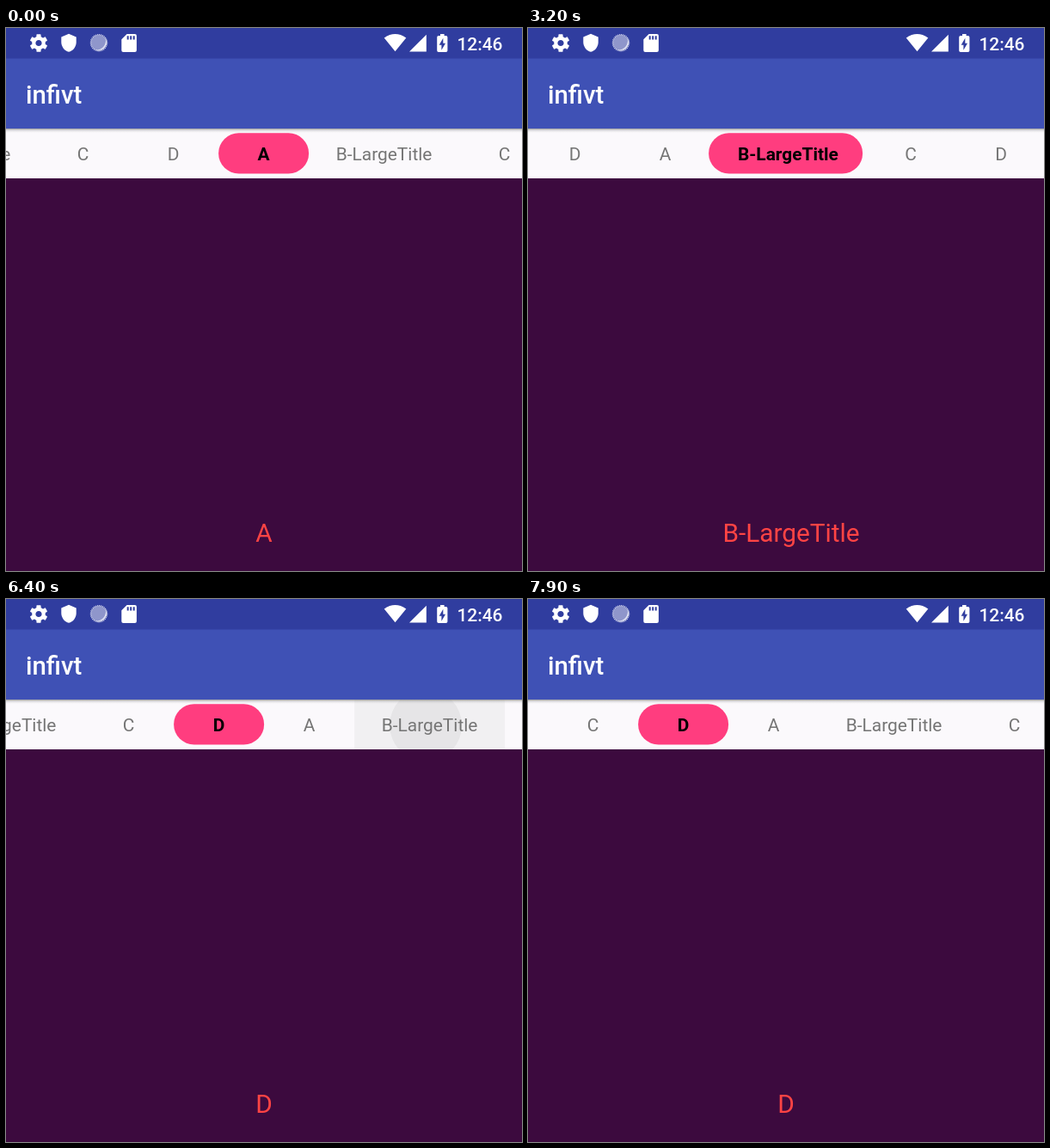
Recreate the animation shown at these times as an HTML page. Size 600 by 632 pixels, loop 8000 ms.

```html
<!DOCTYPE html>
<html lang="en">
<head>
<meta charset="utf-8">
<title>Infinite tabs</title>
<style>
  html, body { margin: 0; width: 100%; height: 100%; overflow: hidden; background: #3c0a3e; }
  svg { display: block; width: 100%; height: 100%; font-family: Roboto, sans-serif; }
  .tab { font-size: 20.9px; fill: #757575; text-anchor: middle; }
  .tab.on { font-weight: 700; fill: #000; }
  .page { font-size: 29.8px; fill: #ff4444; text-anchor: middle; }
</style>
</head>
<body>
<svg viewBox="0 0 600 632">
  <defs>
    <linearGradient id="shade" x2="0" y2="1">
      <stop offset="0" stop-color="#777" stop-opacity=".75"/>
      <stop offset=".4" stop-color="#999" stop-opacity=".3"/>
      <stop offset="1" stop-color="#bbb" stop-opacity="0"/>
    </linearGradient>
    <clipPath id="strip"><rect y="117" width="600" height="58"/></clipPath>
  </defs>

  <rect width="600" height="632" fill="#3c0a3e"/>
  <g id="pages"></g>

  <rect y="116" width="600" height="59" fill="#fbf9fc"/>
  <g clip-path="url(#strip)">
    <g id="ripple">
      <rect y="117" width="175" height="58" fill="#f1f0f2"/>
      <circle cx="83" cy="147" r="42" fill="#e6e5e7"/>
    </g>
    <rect y="117" width="600" height="5" fill="url(#shade)"/>
    <g id="pills" fill="#ff3d7f"></g>
    <g id="tabs"></g>
  </g>

  <rect width="600" height="117" fill="#3f51b5"/>
  <rect width="600" height="35.5" fill="#303d9f"/>
  <text x="23" y="87.5" font-size="29.4" font-weight="500" fill="#fff">infivt</text>

  <g fill="#fff">
    <g id="gear" transform="translate(38 17.5)">
      <circle r="5.7" fill="none" stroke="#fff" stroke-width="4.2"/>
    </g>
    <path d="M73 6.8l8.7 3.8v5.8c0 5.3-3.7 10.2-8.7 11.4c-5-1.2-8.7-6.1-8.7-11.4v-5.8z"/>
    <circle cx="108" cy="17.2" r="9.2" fill="#8f96cb"/>
    <circle cx="108" cy="17.2" r="9.4" fill="none" stroke="#c9cde8" stroke-width="1.6" stroke-dasharray="1.2 .8"/>
    <path d="M115.5 12a9.4 9.4 0 0 1-12 13.3a10.5 10.5 0 0 0 12-13.3z" fill="#e6e8f5"/>
    <path d="M140.600 7h9.300q2 0 2 2v17q0 2-2 2h-13.600q-2 0-2-2v-12.800z"/>
    <path d="M141.700 9.300v4.200M145.200 9.300v4.200M148.700 9.300v4.200" stroke="#303d9f" stroke-width="2"/>
    <path d="M452.500 27.300L439.700 11.400q12.800-8.600 25.600 0z"/>
    <path d="M488.800 7.800v19.800h-19.800z"/>
    <path d="M505 7h4.600v2h2q1.800 0 1.800 1.800v15.400q0 1.800-1.800 1.800h-8.600q-1.800 0-1.800-1.800v-15.400q0-1.800 1.800-1.800h2z"/>
    <path d="M508.300 11.800v5.900h2.700l-4.600 8v-6h-2.700z" fill="#303d9f"/>
    <text x="524.400" y="25.600" font-size="20.900" font-weight="500">12:46</text>
  </g>
</svg>

<script>
const LOOP = 8000, STEP = 100, LAG = 16;
const MID = 299.6, SMALL = 105, LARGE = 175, LARGE_BOLD = 180.5;
const LABELS = ['A', 'B-LargeTitle', 'C', 'D'];
const FIRST = -5, COUNT = 18;

// [time, value] keys
const PAGER = [
  [2700, 0], [2800, .12], [2900, .42], [3000, .76], [3100, .93], [3200, .99],
  [3400, 1.1], [3500, 1.15], [3600, 1.13], [3700, 1.06], [3800, 1.015], [3880, 1],
  [4000, 1], [4100, 1.4], [4200, 1.88], [4280, 2],
  [4700, 2], [4800, 2.3], [4900, 2.76], [5000, 2.96], [5080, 3]
];
const DRAG = [[6300, 0], [6400, 52], [6700, 236], [7000, 404], [7200, 473], [7500, 546], [7900, 609]];
const RIPPLE = [[6400, 1], [6600, 0]];

const $ = id => document.getElementById(id);
const mix = (a, b, k) => a + (b - a) * k;
const mod = (n, m) => (n % m + m) % m;

function add(parent, tag, attrs, text = '') {
  const node = document.createElementNS('http://www.w3.org/2000/svg', tag);
  for (const key in attrs) node.setAttribute(key, attrs[key]);
  node.textContent = text;
  return parent.appendChild(node);
}

function sample(keys, t) {
  if (t <= keys[0][0]) return keys[0][1];
  const n = keys.findIndex(k => k[0] >= t);
  if (n < 0) return keys[keys.length - 1][1];
  const [t0, a] = keys[n - 1], [t1, b] = keys[n];
  return mix(a, b, (t - t0) / (t1 - t0));
}

for (let a = 0; a < 360; a += 60)
  add($('gear'), 'rect', { x: -2.6, y: -10.3, width: 5.2, height: 5, rx: .8, transform: `rotate(${a})` });

const tabs = Array.from({ length: COUNT }, (_, n) =>
  add($('tabs'), 'text', { y: 154.3 }, LABELS[mod(n + FIRST, 4)]));
const pills = [-1, 0, 1, 2].map(turn => ({
  turn, node: add($('pills'), 'rect', { y: 122.3, height: 47.2, rx: 23.6 })
}));
const pages = LABELS.map(label => add($('pages'), 'text', { class: 'page', y: 598 }, label));

function draw(t) {
  const page = sample(PAGER, t), pos = sample(PAGER, t - LAG);
  const selected = Math.round(page);
  const large = selected === 1 ? LARGE_BOLD : LARGE;
  const period = 3 * SMALL + large;

  const width = i => mod(i, 4) === 1 ? large : SMALL;
  const left = i => {
    const k = mod(i, 4);
    return Math.floor(i / 4) * period + k * SMALL + (k > 1 ? large - SMALL : 0);
  };

  const i = Math.floor(pos), k = pos - i;
  const pillLeft = mix(left(i), left(i + 1), k);
  const pillWidth = mix(width(i), width(i + 1), k);
  const shift = MID - pillLeft - pillWidth / 2 - sample(DRAG, t);

  pills.forEach(({ turn, node }) => {
    node.setAttribute('x', pillLeft + shift + turn * period);
    node.setAttribute('width', pillWidth);
  });
  tabs.forEach((node, n) => {
    const tab = n + FIRST;
    node.setAttribute('x', left(tab) + width(tab) / 2 + shift);
    node.setAttribute('class', mod(tab, 4) === selected ? 'tab on' : 'tab');
  });
  pages.forEach((node, n) => node.setAttribute('x', 300 + 600 * (n - page)));

  $('ripple').setAttribute('transform', `translate(${left(5) + shift} 0)`);
  $('ripple').setAttribute('opacity', t < 6400 ? 0 : sample(RIPPLE, t));
}

const start = performance.now();
function frame() {
  const t = (performance.now() - start) % LOOP;
  draw(Math.floor(t / STEP) * STEP);
  requestAnimationFrame(frame);
}
frame();
</script>
</body>
</html>
```
